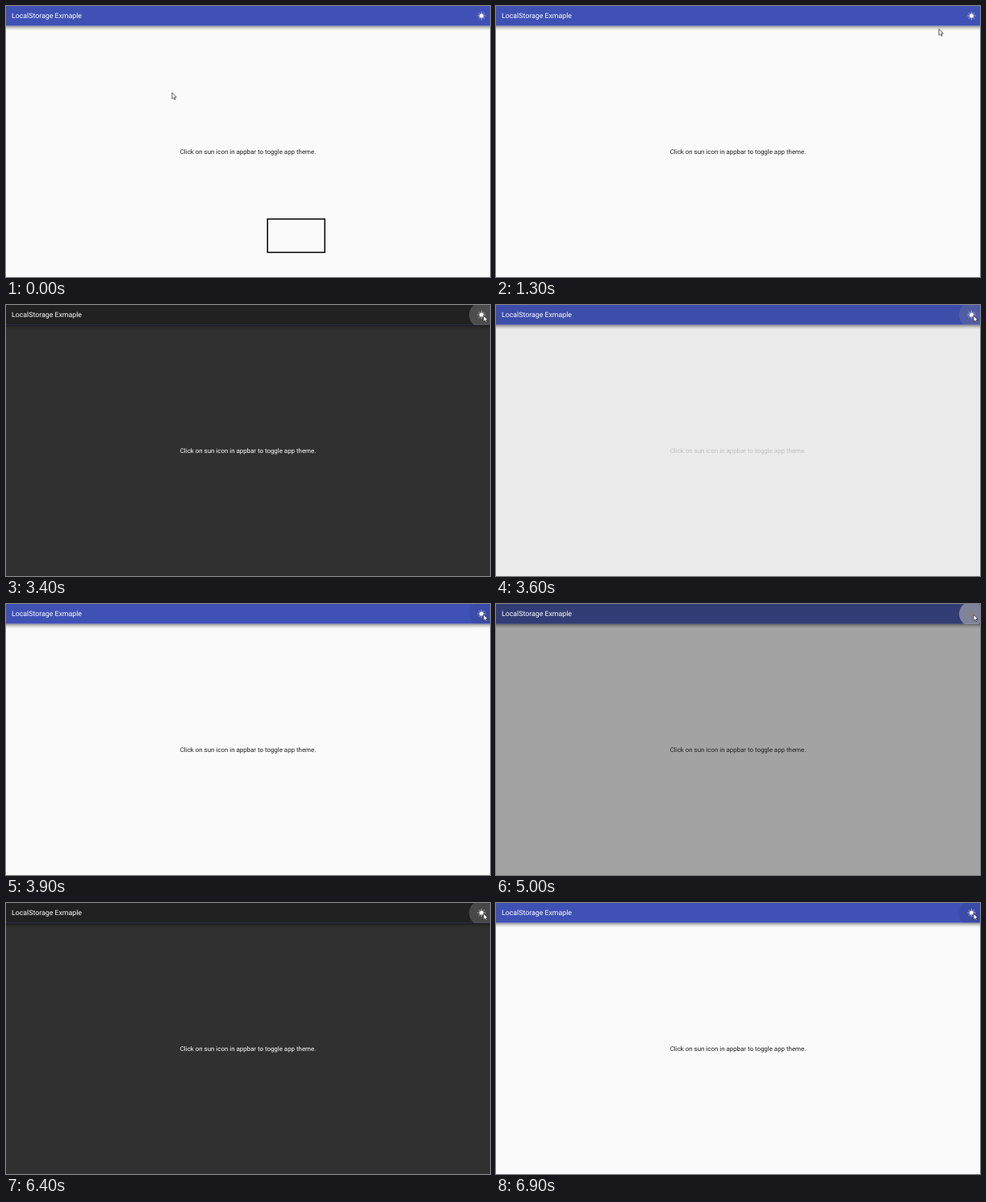
Recreate the animation shown at these times as an HTML page. Size 600 by 337 pixels, loop 7 s.

```html
<!DOCTYPE html>
<html lang="en">
<head>
<meta charset="utf-8">
<title>Theme toggle</title>
<style>
html, body { margin: 0; height: 100%; overflow: hidden; background: #fafafa; }
svg { display: block; width: 100vw; height: 100vh; }
text { font-family: Roboto, "Liberation Sans", sans-serif; text-rendering: geometricPrecision; }
.title { font-size: 8.785px; fill: #fff; }
.hint { font-size: 7.905px; text-anchor: middle; }

.frame, .dark, .hint, .hover, .ripple, .sun, .cursor { animation: 7s step-end infinite; }
.frame { animation-name: frame; }
.dark { animation-name: dark; }
.hint { animation-name: hint; }
.hover { animation-name: hover; }
.ripple { animation-name: ripple; transform-origin: 589.45px 12.3px; }
.sun { animation-name: sun; }
.cursor { animation-name: cursor; }

@keyframes frame {
  0% { opacity: 1; }
  1.42%, 100% { opacity: 0; }
}
/* theme blend: 0 light, 1 dark */
@keyframes dark {
  0% { opacity: 0; }
  34.28% { opacity: .43; }
  35.71% { opacity: .93; }
  37.14% { opacity: 1; }
  50% { opacity: .57; }
  51.42% { opacity: .07; }
  52.85% { opacity: 0; }
  71.42% { opacity: .43; }
  72.85% { opacity: .93; }
  74.28% { opacity: 1; }
  92.85% { opacity: .5; }
  94.28% { opacity: .06; }
  95.71%, 100% { opacity: 0; }
}
/* the text follows the theme a little later */
@keyframes hint {
  0% { fill: #212121; }
  35.71% { fill: #5c5c5c; }
  37.14% { fill: #c8c8c8; }
  38.57% { fill: #fff; }
  51.42% { fill: #c0c0c0; }
  52.85% { fill: #6a6a6a; }
  54.28% { fill: #303030; }
  55.71% { fill: #212121; }
  72.85% { fill: #5c5c5c; }
  74.28% { fill: #c8c8c8; }
  75.71% { fill: #fff; }
  94.28% { fill: #b0b0b0; }
  95.71% { fill: #3a3a3a; }
  98.57%, 100% { fill: #212121; }
}
@keyframes hover {
  0% { opacity: 0; fill: #000; }
  28.57% { opacity: .07; fill: #000; }
  35.71% { opacity: .05; fill: #fff; }
  51.42% { opacity: .07; fill: #000; }
  72.85% { opacity: .05; fill: #fff; }
  94.28%, 100% { opacity: .07; fill: #000; }
}
@keyframes ripple {
  0% { opacity: 0; transform: scale(.4); }
  31.42% { opacity: .3; transform: scale(.6); }
  32.85% { opacity: .5; transform: scale(.9); }
  34.28% { opacity: .55; transform: none; }
  35.71% { opacity: .3; transform: none; }
  37.14% { opacity: .18; transform: none; }
  38.57% { opacity: .1; transform: none; }
  40% { opacity: .04; transform: none; }
  41.42% { opacity: 0; transform: scale(.4); }
  47.14% { opacity: .15; transform: scale(.7); }
  48.57% { opacity: .22; transform: none; }
  50% { opacity: .25; transform: none; }
  51.42% { opacity: .18; transform: none; }
  52.85% { opacity: .1; transform: none; }
  54.28% { opacity: .04; transform: none; }
  55.71% { opacity: 0; transform: scale(.4); }
  68.57% { opacity: .3; transform: scale(.6); }
  70% { opacity: .5; transform: scale(.9); }
  71.42% { opacity: .55; transform: none; }
  72.85% { opacity: .25; transform: none; }
  74.28% { opacity: .1; transform: none; }
  75.71% { opacity: 0; transform: none; }
  91.42% { opacity: .19; transform: none; }
  92.85% { opacity: .2; transform: none; }
  94.28% { opacity: .1; transform: none; }
  95.71%, 100% { opacity: 0; transform: none; }
}
@keyframes sun {
  0% { color: #fff; }
  34.28% { color: #85857c; }
  35.71% { color: #d8d8d8; }
  37.14% { color: #fff; }
  71.42% { color: #85857c; }
  72.85% { color: #d8d8d8; }
  74.28%, 100% { color: #fff; }
}
@keyframes cursor {
  0% { transform: translate(205.8px, 107.7px); }
  8.57% { transform: translate(205.8px, 107.7px); animation-timing-function: steps(7); }
  18.57% { transform: translate(549px, 28.5px); }
  22.85% { transform: translate(549px, 28.5px); animation-timing-function: steps(5); }
  30%, 100% { transform: translate(592px, 13px); }
}
</style>
</head>
<body>
<svg viewBox="0 0 600 337" preserveAspectRatio="none">
  <defs>
    <linearGradient id="shade" x2="0" y2="1">
      <stop offset="0" stop-opacity=".42"/>
      <stop offset=".35" stop-opacity=".2"/>
      <stop offset=".7" stop-opacity=".05"/>
      <stop offset="1" stop-opacity="0"/>
    </linearGradient>
    <clipPath id="bar"><path d="M0 0H600V24.6H0z"/></clipPath>
    <path id="rays" d="M0-11V-8M0 8V11M-11 0H-8M8 0H11"/>
  </defs>

  <rect width="600" height="337" fill="#fafafa"/>
  <rect class="dark" width="600" height="337" fill="#303030"/>
  <rect y="24.6" width="600" height="6.4" fill="url(#shade)"/>
  <rect width="600" height="24.6" fill="#3f51b5"/>
  <rect class="dark" width="600" height="24.6" fill="#212121"/>

  <text class="title" x="7.03" y="15.3">LocalStorage Exmaple</text>
  <text class="hint" x="300" y="183.6">Click on sun icon in appbar to toggle app theme.</text>
  <rect class="frame" x="324.2" y="264.9" width="71" height="41.5" fill="none" stroke="#000" stroke-width="1.5"/>

  <g clip-path="url(#bar)">
    <circle class="hover" cx="589.45" cy="12.3" r="15.4"/>
    <circle class="ripple" cx="589.45" cy="12.3" r="15.4" fill="#c4c4c4"/>
  </g>
  <g class="sun" fill="currentColor" stroke="currentColor">
    <g transform="translate(589.45 12.1) scale(.439)" stroke-width="2">
      <circle r="6" stroke="none"/>
      <use href="#rays"/>
      <use href="#rays" transform="rotate(45)"/>
    </g>
  </g>

  <path class="cursor" d="M0 0V7.8L1.8 6.2 3 8.8 4.3 8.2 3.1 5.7H5.4z" fill="#fff" stroke="#333" stroke-width=".8" stroke-linejoin="round"/>
</svg>
</body>
</html>
```
